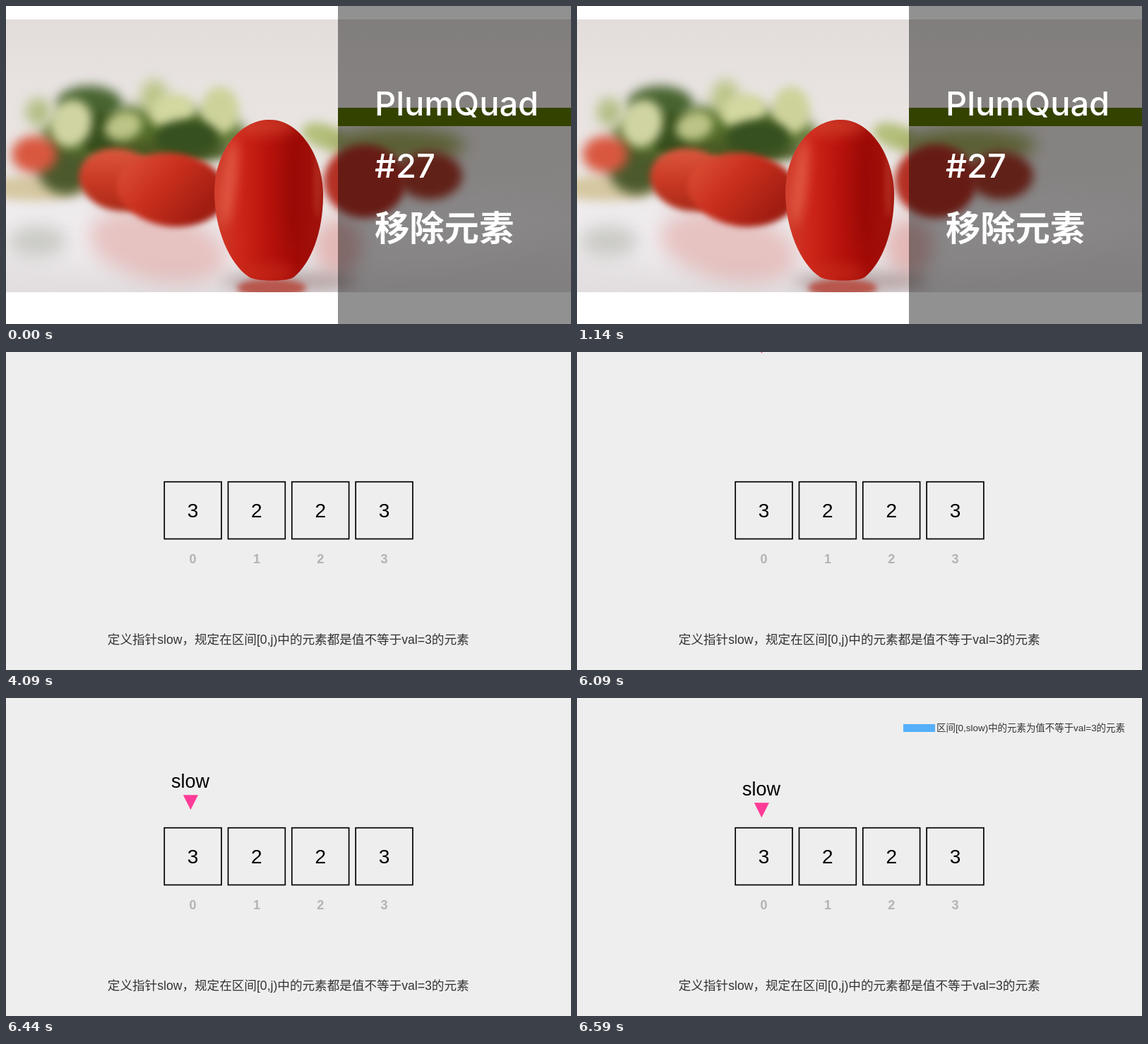
Animation of 800 by 450 pixels, one loop 8 s. Source, as an HTML page with a canvas:

```html
<!DOCTYPE html>
<html lang="zh-CN">
<head>
<meta charset="utf-8">
<title>移除元素</title>
<style>
html, body { margin: 0; width: 100%; height: 100%; overflow: hidden; background: #eee; }
canvas { display: block; width: 100vw; height: 100vh; }
</style>
</head>
<body>
<canvas id="stage" width="800" height="450"></canvas>
<script>
const W = 800, H = 450, LOOP = 8000;
const COVER_END = 2040, CAPTION_AT = 4090, DROP_AT = 6090, DROP_MS = 500, STEP = 50;
const CJK = '"Noto Sans CJK SC", "Noto Sans CJK", sans-serif';
const BODY = '"Liberation Sans", ' + CJK;
const TITLE = 'Inter, ' + CJK;

const ctx = document.getElementById('stage').getContext('2d');
const cover = makeCover();

function text(c, str, x, y, font, color, align = 'center') {
  c.font = font;
  c.fillStyle = color;
  c.textAlign = align;
  c.fillText(str, x, y);
}

function rect(c, x, y, w, h, color) {
  c.fillStyle = color;
  c.fillRect(x, y, w, h);
}

function blob(c, x, y, rx, ry, color, blur, tilt = 0) {
  c.filter = `blur(${blur}px)`;
  c.fillStyle = color;
  c.beginPath();
  c.ellipse(x, y, rx, ry, tilt, 0, Math.PI * 2);
  c.fill();
  c.filter = 'none';
}

function gradient(c, x0, y0, x1, y1, ...colors) {
  const g = c.createLinearGradient(x0, y0, x1, y1);
  colors.forEach((color, i) => g.addColorStop(i / (colors.length - 1), color));
  return g;
}

function drawBackdrop(c) {
  rect(c, 0, 19, W, 386, gradient(c, 0, 19, 0, 405, '#e2dddb', '#e8e3e1', '#eae5e2', '#ece8e9', '#e2dee0'));
  blob(c, 130, 325, 260, 38, '#f0edf0', 18, 0.12);
  blob(c, 600, 320, 190, 45, '#eeebed', 18, -0.12);
}

function drawGreens(c) {
  blob(c, 40, 258, 70, 17, '#d5c7a0', 7);
  blob(c, 85, 225, 42, 42, '#4b5a2c', 8);
  blob(c, 195, 180, 145, 38, '#56702b', 9);
  blob(c, 225, 205, 100, 16, '#4a5a24', 8);
  blob(c, 118, 138, 46, 25, '#48642f', 8);
  blob(c, 133, 182, 30, 32, '#374f1c', 7);
  blob(c, 46, 150, 18, 20, '#b3bd83', 9);
  blob(c, 92, 166, 29, 34, '#d0d4a3', 7, 0.3);
  blob(c, 210, 130, 20, 26, '#bdc58a', 9);
  blob(c, 166, 170, 27, 20, '#bcc486', 7, -0.3);
  blob(c, 236, 149, 32, 24, '#d3d8a0', 7, -0.3);
  blob(c, 303, 148, 27, 34, '#cdd29a', 7);
  blob(c, 256, 187, 46, 26, '#36501f', 7);
  blob(c, 450, 184, 32, 17, '#b4bf7b', 7, 0.3);
  blob(c, 555, 197, 95, 24, '#a0a75c', 11);
}

function drawBackTomatoes(c) {
  blob(c, 40, 210, 32, 26, '#d9573f', 8);
  blob(c, 215, 340, 100, 48, 'rgba(214,120,112,.36)', 14, 0.2);
  blob(c, 45, 332, 42, 22, 'rgba(120,125,105,.3)', 12);
  blob(c, 470, 340, 34, 40, 'rgba(205,90,80,.35)', 12);
  blob(c, 600, 240, 46, 34, '#a93a2a', 7);
  blob(c, 508, 248, 58, 52, '#b43024', 6);
  blob(c, 160, 246, 57, 44, gradient(c, 0, 200, 0, 290, '#db5a40', '#cb3a24', '#a92a18'), 5, 0.2);
  blob(c, 235, 260, 78, 52, gradient(c, 160, 220, 260, 313, '#dc5038', '#c82e1c', '#a01d11'), 4, 0.12);
}

function drawFrontTomato(c) {
  blob(c, 400, 390, 95, 14, 'rgba(130,95,95,.45)', 10);
  blob(c, 376, 399, 49, 13, '#b7564c', 4);
  const p = new Path2D('M371 161 C414 159 449 211 449 268 C449 320 432 364 407 384'
    + ' C398 390 357 390 345 384 C315 365 295 313 295 263 C296 205 330 163 371 161 Z');
  c.save();
  c.filter = 'blur(.7px)';
  c.fillStyle = gradient(c, 295, 0, 449, 0, '#d03c2b', '#cc2418', '#b8130c', '#a30b07', '#9f130c');
  c.fill(p);
  c.filter = 'none';
  c.clip(p);
  blob(c, 365, 169, 48, 14, 'rgba(216,75,52,.6)', 9);
  blob(c, 316, 250, 9, 62, 'rgba(236,110,88,.7)', 8, 0.12);
  blob(c, 405, 260, 14, 85, 'rgba(135,8,6,.4)', 11);
  blob(c, 441, 248, 4, 52, 'rgba(210,91,68,.45)', 4);
  blob(c, 365, 378, 43, 13, 'rgba(200,50,30,.5)', 9);
  c.restore();
}

function makeCover() {
  const canvas = document.createElement('canvas');
  canvas.width = W;
  canvas.height = H;
  const c = canvas.getContext('2d');
  rect(c, 0, 0, W, H, '#fff');
  c.save();
  c.beginPath();
  c.rect(0, 19, W, 386);
  c.clip();
  drawBackdrop(c);
  drawGreens(c);
  drawBackTomatoes(c);
  drawFrontTomato(c);
  c.restore();

  rect(c, 470, 0, 330, H, 'rgba(0,0,0,.43)');
  rect(c, 470, 144, 330, 26, '#344200');
  text(c, 'PlumQuad', 522, 155, '500 47px ' + TITLE, '#fff', 'left');
  text(c, '#27', 522, 243, '500 47px ' + TITLE, '#fff', 'left');
  text(c, '移除元素', 522, 332, 'bold 49.3px ' + CJK, '#fff', 'left');
  return canvas;
}

function drawArray() {
  ctx.strokeStyle = '#000';
  ctx.lineWidth = 1.7;
  [3, 2, 2, 3].forEach((value, i) => {
    const x = 264.6 + i * 90.3;
    ctx.strokeRect(x - 40.4, 183.7, 80.8, 80.8);
    text(ctx, value, x, 234.3, '28px ' + BODY, '#000');
    text(ctx, i, x, 299.3, 'bold 18px ' + BODY, '#b3b3b3');
  });
}

// tip is the y of the arrow's lower point
function drawPointer(tip) {
  text(ctx, 'slow', 261, tip - 31, '27px ' + BODY, '#000');
  ctx.fillStyle = '#ff3b98';
  ctx.beginPath();
  ctx.moveTo(250.8, tip - 21);
  ctx.lineTo(272, tip - 21);
  ctx.lineTo(261.4, tip);
  ctx.fill();
}

function drawLegend() {
  rect(ctx, 462, 37, 45, 11, '#55affb');
  text(ctx, '区间[0,slow)中的元素为值不等于val=3的元素', 509, 47.3, '13.44px ' + BODY, '#333', 'left');
}

function draw(t) {
  if (t < COVER_END) {
    ctx.drawImage(cover, 0, 0);
    return;
  }
  rect(ctx, 0, 0, W, H, '#eee');
  drawArray();
  if (t >= CAPTION_AT) {
    text(ctx, '定义指针slow，规定在区间[0,j)中的元素都是值不等于val=3的元素', 399.7, 413, '17.6px ' + BODY, '#333');
  }
  if (t >= DROP_AT) {
    const held = Math.floor((t - DROP_AT) / STEP) * STEP;
    const p = Math.min(held / DROP_MS, 1);
    drawPointer(2 + 167.3 * (1 - (1 - p) ** 2.25));
    if (p === 1) drawLegend();
  }
}

const start = performance.now();
function tick() {
  draw((performance.now() - start) % LOOP);
  requestAnimationFrame(tick);
}
tick();
</script>
</body>
</html>
```
